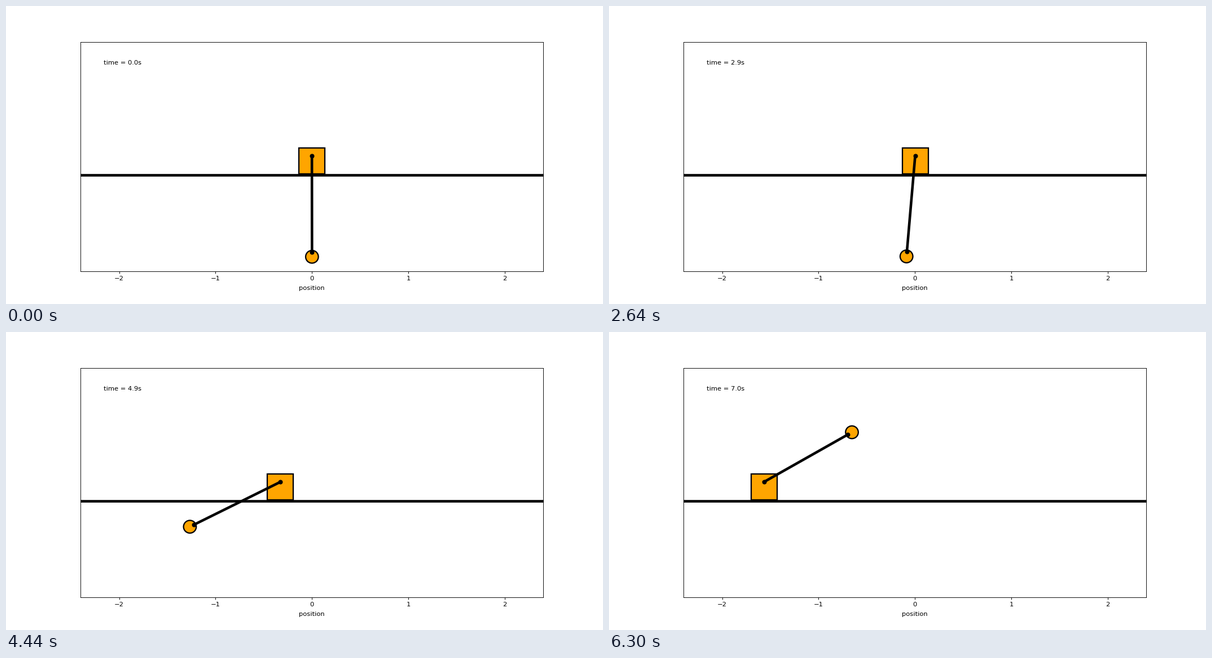
A matplotlib script for the animation above (6.33 s loop, 1058 px wide and 529 px high).

```python
import numpy as np
import matplotlib.pyplot as plt
from matplotlib.animation import FuncAnimation
from matplotlib.patches import Circle, Rectangle

FRAMES, INTERVAL, FPS = 211, 30, 30
CART, PIVOT_Y, ROD, BOB = 0.27, 0.2, 1.0, 1.048

# Poses of the large swing: time, cart position, pole angle from hanging
POSES = [
    (3.9, 0.117, 0.30), (4.1, -0.05, 0.44), (4.35, -0.30, 0.29),
    (4.65, -0.50, -0.46), (4.933, -0.328, -1.11), (5.167, 0.187, -1.17),
    (5.567, 1.134, 0.131), (5.767, 1.095, 1.53), (5.9, 0.656, 2.38),
    (6.37, -0.95, 4.68), (6.633, -0.92, 6.18), (7.0, -1.566, 8.369),
]


def small_swing(t):
    """Growing oscillation of a pole pumped by a cart moving against it."""
    rate = 1.52 + 2.96j
    z = 0.43 * np.exp(rate * (t - 3.9) - 0.797j)
    cart = -2 * rate.real / rate * z
    return t, cart.real + 0.006 * np.tanh(t), z.real


def spline(t, y, at):
    """Natural cubic spline through (t, y), sampled at the given times."""
    n, h = len(t), np.diff(t)
    slope = np.diff(y) / h
    a, b = np.eye(n), np.zeros(n)
    for i in range(1, n - 1):
        a[i, i - 1:i + 2] = h[i - 1], 2 * (h[i - 1] + h[i]), h[i]
        b[i] = 6 * (slope[i] - slope[i - 1])
    m = np.linalg.solve(a, b)
    k = np.clip(np.searchsorted(t, at, side="right") - 1, 0, n - 2)
    d, w = at - t[k], h[k]
    v = slope[k] - w * (2 * m[k] + m[k + 1]) / 6
    return y[k] + d * (v + d * (m[k] / 2 + d * (m[k + 1] - m[k]) / (6 * w)))


times = np.arange(FRAMES) / FPS
start = np.transpose(small_swing(np.linspace(0, 3.7, 38)))
key_t, key_x, key_angle = np.vstack([start, POSES]).T
cart_x = spline(key_t, key_x, times)
angle = spline(key_t, key_angle, times)

fig, ax = plt.subplots(figsize=(12.8, 6.4), dpi=82.65625)
ax.set_aspect("equal")
ax.set_xlim(-2.4, 2.4)
ax.set_ylim(-0.9972, 1.3855)
ax.set_xticks(range(-2, 3))
ax.set_yticks([])
ax.tick_params(axis="x", pad=4.2)
ax.set_xlabel("position", labelpad=5.3)

ax.axhline(0, color="black", lw=4)
style = dict(facecolor="orange", edgecolor="black", lw=2, zorder=3)
cart = ax.add_patch(Rectangle((0, 0.0125), CART, CART, **style))
bob = ax.add_patch(Circle((0, 0), 0.066, **style))
rod, = ax.plot([], [], "o-", color="black", lw=4, zorder=4)
label = ax.text(0.05, 0.9, "", transform=ax.transAxes)


def update(i):
    x, th = cart_x[i], angle[i]
    dx, dy = np.sin(th), -np.cos(th)
    cart.set_x(x - CART / 2)
    bob.center = x + BOB * dx, PIVOT_Y + BOB * dy
    rod.set_data([x, x + ROD * dx], [PIVOT_Y, PIVOT_Y + ROD * dy])
    label.set_text(f"time = {times[i]:.1f}s")
    return cart, bob, rod, label


anim = FuncAnimation(fig, update, frames=FRAMES, interval=INTERVAL, repeat=True)
plt.show()
```
